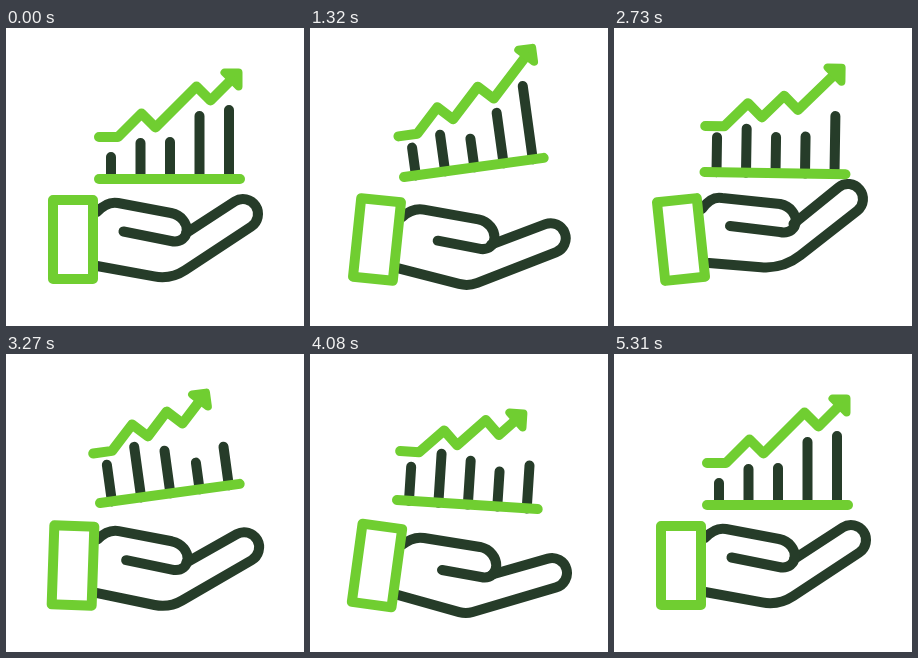
An HTML page that plays this animation: 298 px wide and 298 px high, repeating every 5.4 s.

```html
<!DOCTYPE html>
<html lang="en">
<head>
<meta charset="utf-8">
<title>Growth in hand</title>
<style>
  html, body { margin: 0; width: 100%; height: 100%; overflow: hidden; background: #fff; }
  svg { display: block; width: 100vw; height: 100vh; }
  path { fill: none; stroke-width: 10; stroke-linecap: round; stroke-linejoin: round; }
  .dark { stroke: #263c29; }
  .green { stroke: #70ce31; }
  #cuff { fill: #fff; }
  #head { fill: #70ce31; stroke-width: 8; }
</style>
</head>
<body>
<svg viewBox="0 0 298 298">
  <path id="palm" class="dark"/>
  <path id="finger" class="dark"/>
  <path id="cuff" class="green" d="M-20 -39.5H20V39.5H-20Z"/>
  <g id="chart">
    <path id="bars" class="dark"/>
    <path class="green" d="M0 0H141"/>
    <path id="trend" class="green"/>
    <path id="head" class="green" d="M-12 -2H2V12Z"/>
  </g>
</svg>
<script>
const LOOP = 5400;
const $ = id => document.getElementById(id);
const set = (id, name, value) => $(id).setAttribute(name, value);

// hand sway, chart x, y, tilt, trend lift, two trend climbs, five bar heights
const REST = [0, 93, 151, 0, 42, 41, 26, 22, 36, 37, 63, 69];
const POSES = [
  [330, ...REST],
  [1320, .78, 94, 149, -7.8, 41, 29, 43, 28, 37, 29, 51, 74],
  [1980, .33, 88, 149, 0, 42, 24, 54, 30, 38, 26, 46, 77],
  [2730, -1, 90.5, 144, .9, 46, 22, 41, 35, 44, 36, 37, 58],
  [3270, .27, 94, 149, -7.8, 50, 22, 25.5, 37, 51, 43, 27, 39],
  [4080, 1, 87, 146, 3.7, 49, 27, 21, 34, 49, 44, 35, 43],
  [5010, 0, 93, 151, 0, 42, 41, 55, 22, 36, 37, 63, 76],
  [5310, ...REST]
];

const slope = (i, k) => {
  const a = POSES[i - 1], b = POSES[i + 1];
  return a && b ? (b[k] - a[k]) / (b[0] - a[0]) : 0;
};

// Smooth cubic through the poses
function poseAt(t) {
  const i = POSES.findIndex(p => p[0] > t) - 1;
  if (i < 0) return REST;
  const a = POSES[i], b = POSES[i + 1], span = b[0] - a[0];
  const u = (t - a[0]) / span, v = 1 - u;
  return REST.map((_, n) => {
    const k = n + 1;
    return a[k] * v * v * (1 + 2 * u) + b[k] * u * u * (3 - 2 * u)
      + span * u * v * (v * slope(i, k) - u * slope(i + 1, k));
  });
}

function drawHand(s) {
  // Bend from raised through resting to lowered
  const bend = (up, mid, down) => mid + s * (down - up) / 2 + s * s * ((down + up) / 2 - mid);
  const point = (up, mid, down) => [0, 1].map(k => bend(up[k], mid[k], down[k]));
  const move = (p, x, y) => [p[0] + x, p[1] + y];
  const toward = (p, q, d) => {
    const len = Math.hypot(q[0] - p[0], q[1] - p[1]);
    return move(p, (q[0] - p[0]) * d / len, (q[1] - p[1]) * d / len);
  };

  set('cuff', 'transform', `translate(67 211.5) rotate(${bend(-6, 0, 7.8)})`);

  const root = point([88, 181], [91, 184], [92, 191]);
  const knuckle = point([108, 170], [112, 175], [114, 184]);
  const top = point([166, 176], [165, 185], [170, 193]);
  const under = point([166, 204], [165, 213], [171, 223]);
  const thumb = point([116, 198], [117.5, 203.5], [132, 216]);
  set('finger', 'd', `M${root}Q${move(knuckle, -11, -2)} ${knuckle}L${top}` +
    `C${move(top, 22, 5)} ${move(under, 20, 4)} ${under}L${thumb}`);

  const r = 15;
  const tip = point([234, 171], [237, 186], [242, 219]);
  const angle = bend(39, 33, 16) * Math.PI / 180;
  const c = Math.cos(angle), n = Math.sin(angle);
  const upper = move(tip, -r * n, -r * c);
  const lower = move(tip, r * n, r * c);
  const heel = point([169, 241], [165, 251.5], [156, 260]);
  const wrist = point([95, 235], [91, 238], [88, 241]);
  const round = bend(22, 17, 7);
  set('palm', 'd', `M${move(upper, -58 * c, 58 * n)}L${upper}A${r} ${r} 0 0 1 ${lower}` +
    `L${toward(heel, lower, round)}Q${heel} ${toward(heel, wrist, round)}L${wrist}`);
}

function drawChart(x, y, tilt, lift, climb, rise, ...bars) {
  set('chart', 'transform', `translate(${x} ${y}) rotate(${tilt})`);
  set('bars', 'd', bars.map((h, i) => `M${12 + 29.5 * i} 0v${-h}`).join(''));

  // Every slanted part of the trend runs at 45 degrees
  const steps = [23.5, -14, climb, -14, rise];
  const diagonal = steps.map(d => `l${Math.abs(d)} ${-d}`).join('');
  set('trend', 'd', `M0 ${-lift}h19${diagonal}`);
  const endX = steps.reduce((sum, d) => sum + Math.abs(d), 19);
  const endY = steps.reduce((sum, d) => sum - d, -lift);
  set('head', 'transform', `translate(${endX} ${endY})`);
}

const start = performance.now();
function frame() {
  const [sway, ...chart] = poseAt((performance.now() - start) % LOOP);
  drawHand(sway);
  drawChart(...chart);
  requestAnimationFrame(frame);
}
frame();
</script>
</body>
</html>
```
